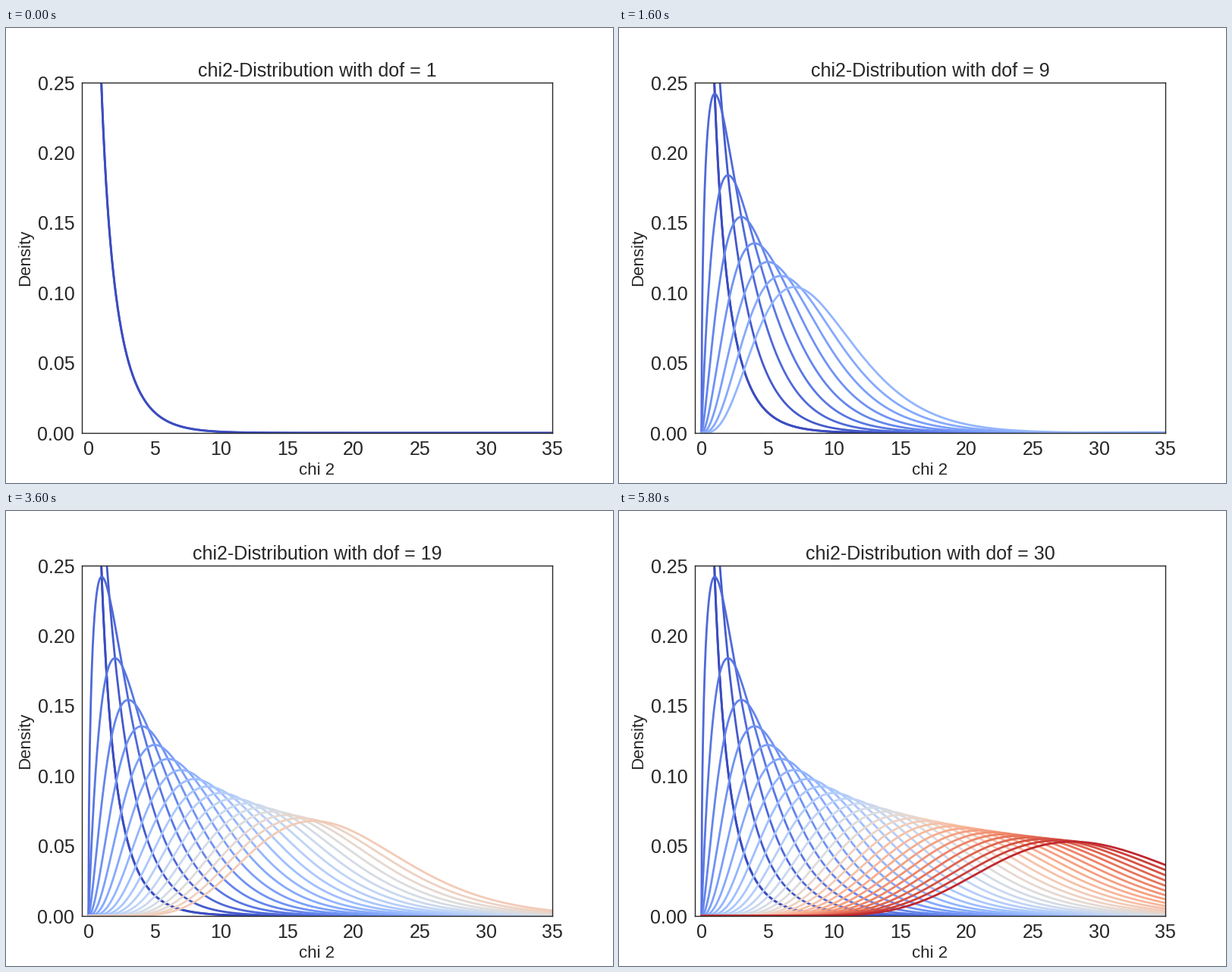
Animation, 800 px wide and 600 px high, one loop 6000 ms. Source, as a matplotlib script:

```python
import math

import numpy as np
import matplotlib.pyplot as plt
from matplotlib.animation import FuncAnimation

MAX_DOF = 30
INK = "0.15"

plt.rcParams.update({
    "font.family": "Liberation Sans",
    "text.color": INK,
    "axes.labelcolor": INK,
    "axes.edgecolor": INK,
    "axes.linewidth": 1,
    "lines.linewidth": 2,
    "lines.solid_capstyle": "round",
})


def chi2_pdf(x, dof):
    half = dof / 2
    with np.errstate(divide="ignore"):
        return x ** (half - 1) * np.exp(-x / 2) / (2 ** half * math.gamma(half))


fig, ax = plt.subplots(figsize=(8, 6), dpi=100, facecolor="white")
ax.set_xlim(-0.5, 35)
ax.set_ylim(0, 0.25)
ax.set_xticks(range(0, 36, 5))
ax.set_yticks(np.linspace(0, 0.25, 6))
ax.yaxis.set_major_formatter("{x:.2f}")
ax.tick_params(length=0, pad=7, labelsize=18, labelcolor=INK)
ax.set_xlabel("chi 2", fontsize=16)
ax.set_ylabel("Density", fontsize=16)
title = ax.set_title("", fontsize=18, pad=6)

x = np.linspace(0, 35, 1000)


def add_curve(dof):
    color = plt.cm.coolwarm((dof - 1) / MAX_DOF)
    return ax.plot(x, chi2_pdf(x, dof), color=color)[0]


add_curve(1)  # the first curve is drawn twice, so its edges look heavier
curves = [add_curve(dof) for dof in range(1, MAX_DOF + 1)]


def update(step):
    for i, curve in enumerate(curves):
        curve.set_visible(i <= step)
    title.set_text(f"chi2-Distribution with dof = {step + 1}")
    return [title, *curves]


anim = FuncAnimation(fig, update, frames=MAX_DOF, interval=200,
                     init_func=lambda: update(0), repeat=True,
                     repeat_delay=0, blit=False)
plt.show()
```
